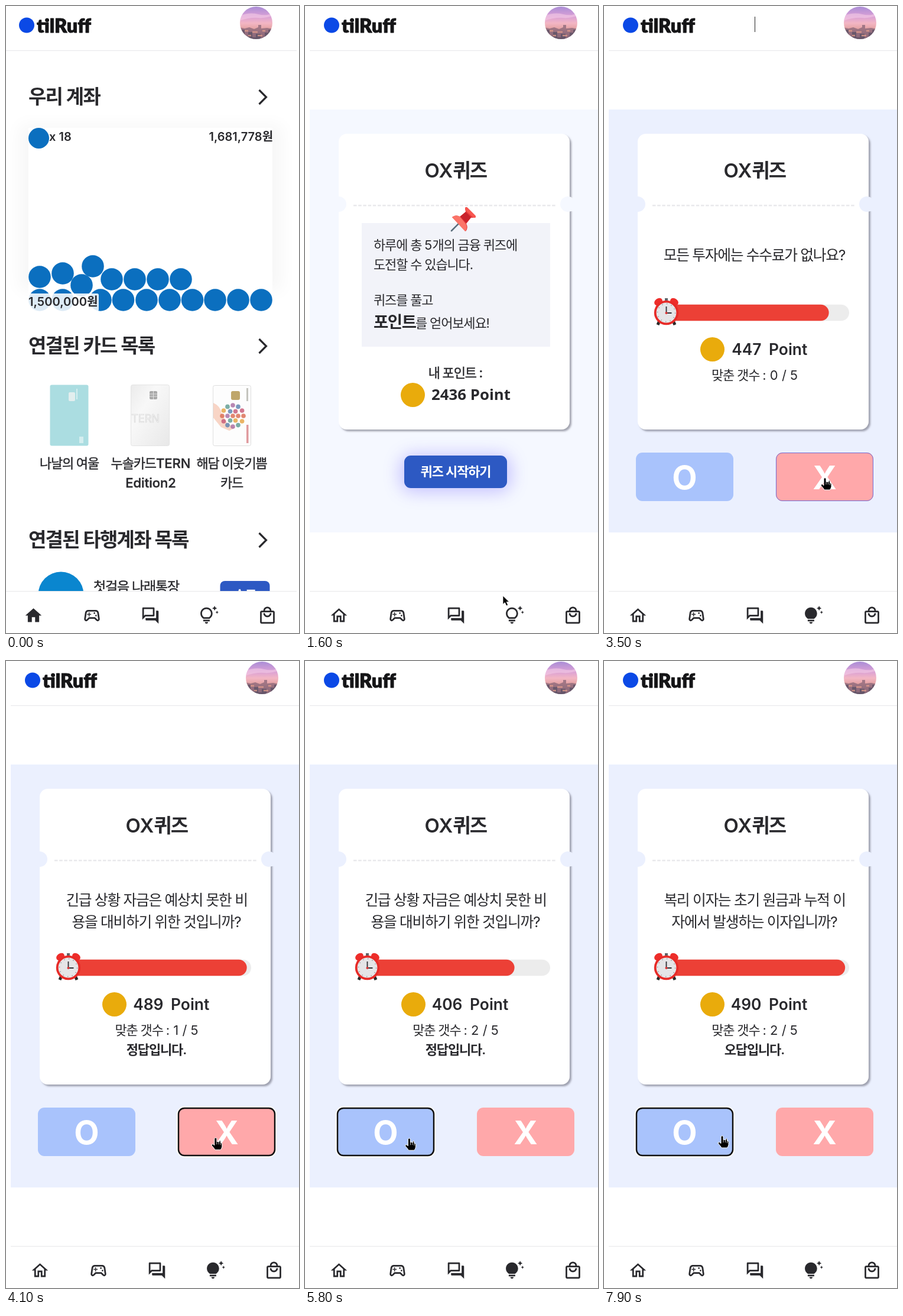
Animation, 496 px wide and 1060 px high, one loop 8000 ms. Source, as an HTML page:

```html
<!DOCTYPE html>
<html lang="ko">
<head>
<meta charset="utf-8">
<title>OX퀴즈</title>
<style>
html, body { margin: 0; width: 100%; height: 100%; overflow: hidden; background: #fff; }
svg { display: block; width: 496px; height: 1060px; }
text { font-family: Inter, "Noto Sans CJK KR", "Noto Sans CJK", sans-serif; fill: #29292d; white-space: pre; }
text[font-weight="500"] { stroke: #29292d; stroke-width: .4px; }
</style>
</head>
<body>
<svg id="stage" viewBox="0 0 496 1060" xmlns="http://www.w3.org/2000/svg">
  <defs>
    <linearGradient id="sky" x1="0" y1="0" x2="0" y2="1">
      <stop offset="0" stop-color="#a78cd6"/><stop offset=".3" stop-color="#d9a0d6"/>
      <stop offset=".5" stop-color="#f3b6c4"/><stop offset=".66" stop-color="#e5a3a4"/>
      <stop offset="1" stop-color="#6b5a6c"/>
    </linearGradient>
    <linearGradient id="silver" x1="0" y1="0" x2="1" y2="1">
      <stop offset="0" stop-color="#ebebeb"/><stop offset=".35" stop-color="#f8f8f8"/><stop offset="1" stop-color="#e8e8e8"/>
    </linearGradient>
    <filter id="soft" x="-30%" y="-50%" width="160%" height="200%"><feGaussianBlur stdDeviation="14"/></filter>
    <filter id="lift" x="-10%" y="-10%" width="120%" height="120%">
      <feDropShadow dx="3" dy="3" stdDeviation="1.6" flood-color="#6b6b78" flood-opacity=".58"/>
    </filter>
    <clipPath id="face"><circle cx="423.5" cy="28.5" r="27.5"/></clipPath>
  </defs>

  <g id="home"></g>

  <g id="quiz">
    <rect id="panel" x="8" y="175" width="488" height="715"/>
    <rect x="57" y="216" width="391" height="500" rx="14" fill="#fff" filter="url(#lift)"/>
    <g id="notch"><circle cx="57" cy="335" r="13"/><circle cx="445" cy="335" r="13"/><rect x="448" y="328" width="7" height="19"/></g>
    <path d="M82 337.3H424" stroke="#e9e9ec" stroke-width="2.6" stroke-dasharray="5.5 2.7"/>
    <g id="intro">
      <rect x="96" y="367" width="319" height="209" fill="#f2f3f9"/>
      <path d="M248 380L262 366" stroke="#5b6f7d" stroke-width="2.6" stroke-linecap="round"/>
      <path d="M249 357q6-5 13-1l10-8-1-7q2-2 4 0l13 13q2 2 0 4l-7 0-8 10q4 7-1 13z" fill="#e53a3c"/>
      <path d="M249 357q6-5 13-1l10 12q4 7-1 13z" fill="#fb7468"/>
      <path d="M263 356l9-8 9 9-8 10z" fill="#c9222b"/>
      <path d="M271 342q2-3 4-1l13 13q2 2 0 4l-3 0-14-13z" fill="#f8564f"/>
      <circle cx="182.5" cy="657.5" r="20.5" fill="#e9ab0c"/>
      <rect x="160" y="757" width="190" height="66" rx="24" fill="#7f70ff" opacity=".37" filter="url(#soft)"/>
      <rect x="168" y="760" width="174" height="55" rx="11" fill="#2d59c3"/>
    </g>
    <g id="play">
      <rect x="96" y="504.700" width="319" height="27.500" rx="13.700" fill="#ececec"/>
      <rect id="bar" x="96" y="504.700" height="27.500" rx="13.700" fill="#ec4036"/>
      <path d="M94 532l-3 7M117 532l3 7" stroke="#292929" stroke-width="5"/>
      <g fill="#ee2d2a"><ellipse cx="92" cy="500" rx="7.5" ry="5.5" transform="rotate(-35 92 500)"/>
      <ellipse cx="119" cy="500" rx="7.5" ry="5.5" transform="rotate(35 119 500)"/></g>
      <path d="M105.500 494v7" stroke="#5f6368" stroke-width="5"/>
      <circle cx="105.500" cy="518.500" r="18.800" fill="#e5e5e7" stroke="#e72b28" stroke-width="3.800"/>
      <circle cx="105.500" cy="518.500" r="15" fill="none" stroke="#97979b" stroke-width="1.500" stroke-dasharray="1.500 6.350"/>
      <path d="M105.500 508v11h9" fill="none" stroke="#303036" stroke-width="1.800"/>
      <circle cx="105.500" cy="519" r="2" fill="#d33"/>
      <circle cx="183.500" cy="580.500" r="20.500" fill="#e9ab0c"/>
      <rect x="54" y="755" width="165" height="82" rx="11" fill="#a9c3fc"/>
      <rect x="291" y="755" width="165" height="82" rx="11" fill="#ffa8aa"/>
      <rect id="hover" y="755.5" width="164" height="81" rx="10.500" fill="none" stroke="#7468cf"/>
      <g id="ring" fill="none">
        <rect x="-1" y="754" width="167" height="84" rx="12" stroke="#fff" stroke-width="2.500"/>
        <rect x="1" y="756" width="163" height="80" rx="10" stroke="#101010" stroke-width="2.500"/>
      </g>
    </g>
  </g>

  <g id="lines" stroke="#e7e7e9"><path d="M0 75.500H492M0 989.500H492"/></g>
  <g id="chrome">
    <circle cx="35" cy="32.500" r="13" fill="#0b49e6"/>
    <g clip-path="url(#face)">
      <rect x="395" y="0" width="58" height="58" fill="url(#sky)"/>
      <path d="M395 17q16-7 32-3t27-4v5q-12 6-27 5t-32 5z" fill="#f6cbe6" opacity=".6"/>
      <path d="M395 36l9 2 8-2 8 3 7-3v-4h5v6l10-1 12 2v20h-59z" fill="#8a6678" opacity=".75"/>
      <path d="M395 40h9v12h6v-8h7v9h6v-6h8v8h7v-10h6v-5h9v20h-58z" fill="#4d4a60" opacity=".6"/>
      <path d="M404 42h6M417 44h9M434 42h5M410 50h5M426 50h8" stroke="#e8a08c" stroke-width="2.500" opacity=".75"/>
    </g>
  </g>
  <g id="nav"></g>
  <path id="caret" d="M255.500 18V44" stroke="#222"/>
  <g id="cursor">
    <path id="arrow" d="M0 0V14.500L3.400 11.500 5.800 17 8.600 15.800 6.200 10.500H10.800Z" fill="#000" stroke="#fff" stroke-width=".8"/>
    <g id="hand">
      <path d="M-2 1.500Q0-1.500 2 1.500V7Q4.500 5.500 5.500 8 8-.2 8.700 9 11 8 11 11V15Q10.500 18 8.500 20.500H-1Q-3 17-6.500 13.500-7.500 10.500-4.500 11L-2 13Z" transform="translate(0 .5)" fill="#000" stroke="#fff"/>
      <path d="M2 8v4M5.400 9v3M8.500 10v3" stroke="#fff" stroke-width=".8"/>
    </g>
  </g>
</svg>
<script>
const NS = 'http://www.w3.org/2000/svg';
const $ = id => document.getElementById(id);

function add(parent, tag, attrs) {
  const el = document.createElementNS(NS, tag);
  for (const k in attrs) el.setAttribute(k, attrs[k]);
  return parent.appendChild(el);
}

// Hangul runs are set a little tighter than Latin ones.
function setText(el, str) {
  if (el.value === str) return;
  el.value = str;
  el.textContent = '';
  for (const run of str.match(/[가-힣 ]+|[^가-힣 ]+/g) || []) {
    const span = add(el, 'tspan', /[가-힣]/.test(run) ? { 'letter-spacing': '-.053em' } : {});
    span.textContent = run;
  }
}

function label(parent, x, y, size, str, weight = 400, anchor = 'start', extra = {}) {
  const el = add(parent, 'text', { x, y, 'font-size': size, 'font-weight': weight, 'text-anchor': anchor, ...extra });
  setText(el, str);
  return el;
}

const show = (el, on) => { el.style.display = on ? '' : 'none'; };
const shift = (el, x, y = 0) => el.setAttribute('transform', `translate(${x} ${y})`);

const home = $('home'), intro = $('intro'), play = $('play'), chrome = $('chrome');
const white = { style: 'fill:#fff' };

function buildHome() {
  const rect = (x, y, width, height, fill, more = {}) => add(home, 'rect', { x, y, width, height, fill, ...more });
  const dot = (cx, cy, r, fill, more = {}) => add(home, 'circle', { cx, cy, r, fill, ...more });

  [[165, '우리 계좌'], [586, '연결된 카드 목록'], [914, '연결된 타행계좌 목록']].forEach(([y, str]) => {
    label(home, 38, y, 33, str, 600);
    add(home, 'path', { d: `M428.500 ${y - 23}l12 12-12 12`, fill: 'none', stroke: '#29292d', 'stroke-width': 3.2 });
  });

  rect(22, 200, 446, 282, '#000', { opacity: .03, filter: 'url(#soft)' });
  rect(38, 206, 413, 310, '#fff');
  const blue = '#0b6fbf';
  dot(55.5, 223.5, 17.5, blue);
  [57, 96, 160, 198.5, 238, 277, 315.5, 354, 393, 432].forEach(x => dot(x, 497, 18.8, blue));
  [[57, 458], [96, 452], [128, 472], [147, 440], [179, 462], [218, 462], [257, 462], [296, 462]]
    .forEach(([x, y]) => dot(x, y, 18.8, blue));
  rect(38, 486, 119, 30, '#fff', { opacity: .86, rx: 3 });
  label(home, 73, 228, 20, 'x 18', 600);
  label(home, 451, 228, 20, '1,681,778원', 600, 'end');
  label(home, 38, 507, 20.2, '1,500,000원', 600);

  rect(74.5, 640.5, 65, 103, '#abdde1', { rx: 3 });
  rect(106, 653, 11, 15, '#e2eeee', { rx: 2 });
  rect(119, 647, 2, 18, '#d4eeef');
  rect(124, 728, 7, 11, '#d4eeef');
  rect(211.5, 640.5, 65, 103, 'url(#silver)', { rx: 3, stroke: '#e4e4e4' });
  rect(243, 651, 13, 14, '#a9a9a9', { rx: 2 });
  add(home, 'path', { d: 'M243 656h13M243 660h13M249.500 651v14', stroke: '#e0e0e0' });
  label(home, 236, 704, 18, 'TERN', 400, 'middle', { style: 'fill:#f4f4f4;stroke:#d4d4d4;stroke-width:.7' });
  rect(350.5, 641.5, 64, 102, '#fdfdfd', { rx: 3, stroke: '#dedede' });
  rect(381, 651, 15, 15, '#bfa66b', { rx: 3 });
  add(home, 'path', { d: 'M351 671q12 5 14 18l10 17 13 7-10 5-14-6-13-16z', fill: '#f8d5c6' });
  const hues = ['#d9694e', '#e5a13f', '#5b9a8f', '#a86aa0', '#597fae', '#c65573'];
  for (let i = 0; i < 19; i++) {
    const ring = i < 1 ? 0 : i < 7 ? 1 : 2, a = i * (ring < 2 ? 1.0472 : .5236);
    dot(384 + Math.cos(a) * ring * 9, 693 + Math.sin(a) * ring * 9, 3.8, hues[i % 6], { opacity: .8 });
  }
  rect(407, 646, 3, 22, '#c4c4be');
  rect(407, 708, 3.5, 31, '#e09a9e');

  [[107, '나날의 여울'], [245, '누솔카드TERN', 'Edition2'], [382, '해담 이웃기쁨', '카드']].forEach(([x, ...rows]) =>
    rows.forEach((str, i) => label(home, x, 781 + 33 * i, 22, str, 500, 'middle')));

  dot(93, 995, 38.5, '#0a86cf');
  label(home, 148, 990, 23.1, '첫걸음 나래통장', 500);
  rect(362.5, 972, 84, 50, '#2d59c3', { rx: 8 });
  label(home, 404.5, 1004, 22, '송금', 600, 'middle', white);
  rect(0, 990, 496, 70, '#fff');
}

function buildIntro() {
  label(intro, 116, 412, 22, '하루에 총 5개의 금융 퀴즈에');
  label(intro, 116, 445, 22, '도전할 수 있습니다.');
  label(intro, 116, 505, 22, '퀴즈를 풀고');
  label(intro, 116, 544, 27.5, '포인트', 700);
  label(intro, 187, 544, 22, '를 얻어보세요!');
  label(intro, 255, 628, 22, '내 포인트 :', 500, 'middle');
  label(intro, 214, 666, 25.8, '2436 Point', 600, 'start', { style: 'font-family:"Noto Sans",sans-serif' });
  label(intro, 255, 795, 22, '퀴즈 시작하기', 600, 'middle', white);
}

const icons = {
  homeFull: 'M10 20v-6h4v6h5v-8h3L12 3 2 12h3v8z',
  homeLine: 'M12 5.690l5 4.500V18h-2v-6H9v6H7v-7.810l5-4.500M12 3L2 12h3v8h6v-6h2v6h6v-8h3z',
  pad: 'M21.580 16.090l-1.090-7.660C20.210 6.460 18.520 5 16.530 5H7.470C5.480 5 3.790 6.460 3.510 8.430l-1.090 7.660C2.200 17.630 3.390 19 4.940 19c.68 0 1.320-.27 1.800-.75L9 16h6l2.250 2.250c.48.48 1.130.75 1.800.75 1.560 0 2.750-1.370 2.530-2.910zM19 17q-.2 0-.4-.2L15.830 14H8.170l-2.840 2.840q-.9.400-.94-.47l1.090-7.650C5.630 7.740 6.480 7 7.470 7h9.060c.99 0 1.840.74 1.980 1.720l1.090 7.660q0 .6-.6.620zM9 8H8v2H6v1h2v2h1v-2h2v-1H9zM16 12a1 1 0 1 0 2 0a1 1 0 1 0-2 0zM14 9a1 1 0 1 0 2 0a1 1 0 1 0-2 0z',
  chat: 'M15 4v7H5.170L4 12.170V4h11m1-2H3c-.55 0-1 .45-1 1v14l4-4h10c.55 0 1-.45 1-1V3c0-.55-.45-1-1-1zm5 4h-2v9H6v2c0 .55.45 1 1 1h11l4 4V7c0-.55-.45-1-1-1z',
  bulbFull: 'M7 20h4c0 1.100-.9 2-2 2s-2-.9-2-2zm-2-1h8v-2H5zM16.500 9.500c0 3.820-2.660 5.860-3.770 6.500H5.270C4.160 15.360 1.500 13.320 1.500 9.500 1.500 5.360 4.860 2 9 2s7.500 3.360 7.500 7.500zM21.370 7.370L20 8l1.370.63L22 10l.63-1.370L24 8l-1.370-.63L22 6zM19 6l.94-2.060L22 3l-2.060-.94L19 0l-.94 2.060L16 3l2.060.94z',
  bag: 'M19 6h-2c0-2.760-2.240-5-5-5S7 3.240 7 6H5c-1.100 0-2 .9-2 2v12c0 1.100.9 2 2 2h14c1.100 0 2-.9 2-2V8c0-1.100-.9-2-2-2zm-7-3c1.660 0 3 1.340 3 3H9c0-1.660 1.340-3 3-3zm7 17H5V8h14zm-7-8c-1.660 0-3-1.340-3-3H7c0 2.760 2.240 5 5 5s5-2.240 5-5h-2c0 1.660-1.340 3-3 3z'
};
icons.bulbLine = icons.bulbFull + 'M14.500 9.500C14.500 6.470 12.030 4 9 4S3.500 6.470 3.500 9.500c0 2.470 1.490 3.890 2.350 4.500h6.300c.86-.61 2.350-2.030 2.350-4.500z';

buildHome();
buildIntro();
label(chrome, 52, 44.5, 32.5, 'tilRuff', 900, 'start',
  { style: 'font-family:Lato,sans-serif;fill:#151517;stroke:#151517;stroke-width:.9;stroke-linejoin:round' });
const nav = ['homeFull', 'pad', 'chat', 'bulbLine', 'bag'].map((name, i) => add($('nav'), 'path', {
  d: icons[name], fill: '#29292d', 'fill-rule': 'evenodd',
  transform: `translate(${46.5 + 99 * i - 16.5} 1014) scale(1.375)`
}));

label($('quiz'), 255, 289.5, 33, 'OX퀴즈', 600, 'middle');
const lineA = label(play, 255, 0, 24.75, '', 400, 'middle');
const lineB = label(play, 255, 449.5, 24.75, '', 400, 'middle');
const points = label(play, 266.5, 590, 26.4, '', 600, 'end');
label(play, 279, 590, 26.4, 'Point', 600);
const hits = label(play, 255, 632, 22, '', 400, 'middle');
const verdict = label(play, 255, 665, 22, '', 600, 'middle');
label(play, 136.5, 817, 55, 'O', 700, 'middle', white);
label(play, 373.5, 817, 55, 'X', 700, 'middle', white);

// from: question appears, go: timer starts, end: answer is clicked
const rounds = [
  { from: 2000, go: 2416, end: 3700, ok: true, text: ['모든 투자에는 수수료가 없나요?'] },
  { from: 3880, go: 3880, end: 5800, ok: true, text: ['긴급 상황 자금은 예상치 못한 비', '용을 대비하기 위한 것입니까?'] },
  { from: 5970, go: 5970, end: 7550, ok: false, text: ['경기 침체는 경제 성장과 확장의', '기간인가요?'] },
  { from: 7696, go: 7696, end: 9999, ok: false, text: ['복리 이자는 초기 원금과 누적 이', '자에서 발생하는 이자입니까?'] }
];

// time, x, y
const path = [
  [400, 262, 880], [900, 342, 1034], [1300, 342, 1034], [1600, 335, 997], [1900, 258, 790], [2100, 258, 790],
  [2600, 307, 803], [3100, 368, 797], [3500, 374, 797], [3900, 374, 797], [4500, 300, 829], [4900, 266, 828],
  [5400, 180, 808], [5900, 176, 806], [6500, 289, 820], [6800, 286, 818], [7300, 203, 803], [7900, 200, 802], [8000, 200, 802]
];

function cursorAt(t) {
  const i = Math.max(1, path.findIndex(p => p[0] >= t));
  const [a, b] = [path[i - 1], path[i]];
  const u = Math.min(1, Math.max(0, (t - a[0]) / (b[0] - a[0])));
  const e = u * u * (3 - 2 * u);
  return [a[1] + (b[1] - a[1]) * e, a[2] + (b[2] - a[2]) * e];
}

const inside = (x, y, l, t, w, h) => x >= l && x <= l + w && y >= t && y <= t + h;

function drawRound(t) {
  const now = rounds.filter(r => t >= r.from).pop() || rounds[0];
  const left = 500 - .049 * Math.max(0, Math.min(t, now.end) - now.go);
  const done = rounds.filter(r => t >= r.end);
  const last = done[done.length - 1];
  lineA.setAttribute('y', now.text[1] ? 412.5 : 430);
  setText(lineA, now.text[0]);
  setText(lineB, now.text[1] || '');
  setText(points, String(Math.round(left)));
  setText(hits, `맞춘 갯수 : ${done.filter(r => r.ok).length} / 5`);
  setText(verdict, last && t < last.end + 500 ? (last.ok ? '정답입니다.' : '오답입니다.') : '');
  $('bar').setAttribute('width', left / 500 * 318.5);
}

function draw(ms) {
  const t = Math.floor(ms % 8000 / 100) * 100;
  const atHome = t < 1200, playing = t >= 2000;
  show(home, atHome);
  show($('quiz'), !atHome);
  show(intro, !playing);
  show(play, playing);
  shift(chrome, atHome ? 0 : 10);
  shift($('nav'), atHome ? 0 : 11);
  shift($('lines'), atHome ? 0 : 8);
  nav[0].setAttribute('d', atHome ? icons.homeFull : icons.homeLine);
  nav[3].setAttribute('d', t >= 2100 ? icons.bulbFull : icons.bulbLine);
  const tone = playing ? '#ebf0fe' : '#f5f8ff';
  $('panel').setAttribute('fill', tone);
  $('notch').setAttribute('fill', tone);
  drawRound(t);

  const [x, y] = cursorAt(t);
  const onO = playing && inside(x, y, 54, 755, 165, 82);
  const onX = playing && inside(x, y, 291, 755, 165, 82);
  const onLink = onO || onX || (t < 2000 && inside(x, y, 318, 1008, 50, 50)) ||
    (!atHome && !playing && inside(x, y, 168, 760, 174, 55));
  show($('cursor'), t >= 400);
  shift($('cursor'), x, y);
  show($('hand'), onLink);
  show($('arrow'), !onLink);
  show($('hover'), onO || onX);
  $('hover').setAttribute('x', onO ? 54.5 : 291.5);
  show($('ring'), t >= rounds[0].end);
  shift($('ring'), t >= rounds[1].end ? 54 : 291);
  show($('caret'), t >= 2100 && t < 3690 && (t - 2100) % 1060 < 530);
}

const begin = performance.now();
function tick() {
  draw(performance.now() - begin);
  requestAnimationFrame(tick);
}
tick();
</script>
</body>
</html>
```
